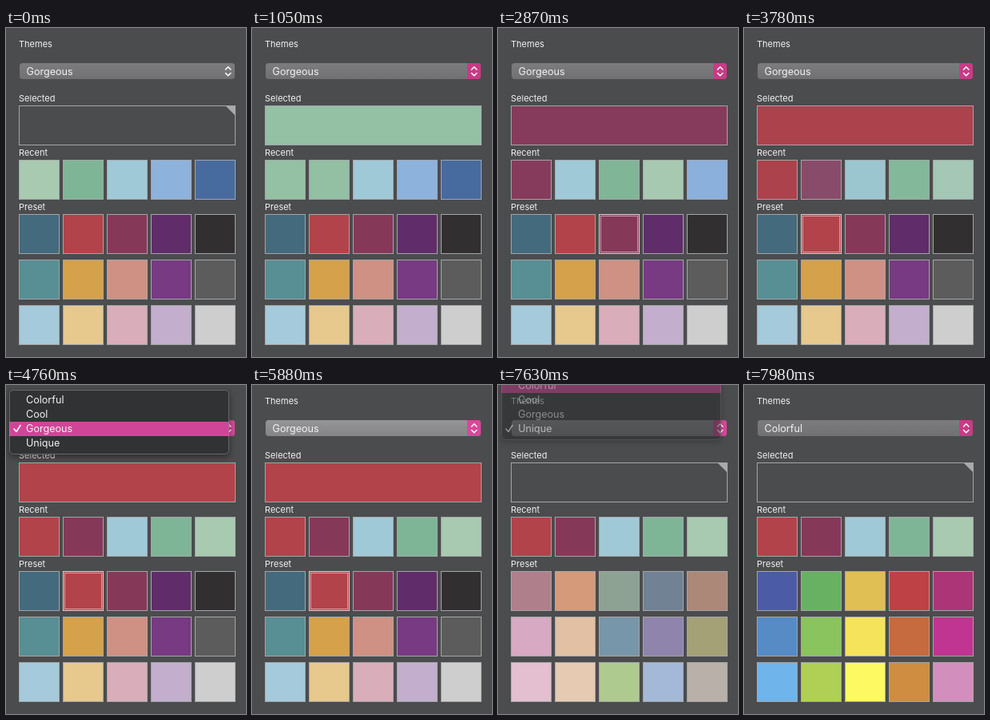
An HTML page with a canvas that plays this animation: 300x412 px, repeating every 8 s.

```html
<!DOCTYPE html>
<html lang="en">
<head>
<meta charset="utf-8">
<title>Theme colour picker</title>
<style>
  html, body { margin: 0; width: 100%; height: 100%; overflow: hidden; background: #4b4c4e; }
  canvas { display: block; }
</style>
</head>
<body>
<canvas width="300" height="412"></canvas>
<script>
const ctx = document.querySelector('canvas').getContext('2d');
const LOOP = 8000, FADE = 500;
const FONT = 'Inter, "Open Sans", sans-serif';
const MENU = ['Colorful', 'Cool', 'Gorgeous', 'Unique'];
const split = s => s.split(' ').map(c => '#' + c);

const THEMES = {
  Gorgeous: split('446a7d b2434a 863859 602c6a 322f31 578f94 d5a14a cf9184 773a83 5c5c5c a5cadb e7c88d d9adb9 c3aecd cecece'),
  Unique: split('af7f8c d59a79 8da293 708293 ab8878 d8a9c3 e2c0a3 7896a9 8f84ab a4a177 e3bfcf e6cab2 afca8f a4b9d8 b8b0a9'),
  Colorful: split('4c5ba5 69b162 e0bf54 bd4145 ab3576 568bc6 89c45f f5e45b c66a3f c03591 6fb4ea afd055 fdf963 ce8d40 d28fbe')
};
const START = split('a8cab0 7fb597 a0c9d8 8db2dc 486b9f');
const [LIGHT_GREEN, GREEN, LIGHT_BLUE] = START;
const [, RED, PLUM] = THEMES.Gorgeous;

// Colour clicks; focus is the index of the clicked preset.
const PICKS = [
  { at: 35, color: LIGHT_GREEN },
  { at: 805, color: GREEN },
  { at: 1645, color: LIGHT_BLUE },
  { at: 2415, color: PLUM, focus: 2 },
  { at: 3395, color: RED, focus: 1 }
];

// Menu visits; moves lists [time, highlighted row].
const VISITS = [
  { open: 4130, close: 5460, top: 6, from: 2, to: 3, moves: [[4130, 2], [5110, 3]] },
  { open: 6580, close: 7350, top: -12, from: 3, to: 0, moves: [[6580, 3], [6860, 2], [7000, 1], [7140, 0]] }
];
const BLINK = 70, HIDE = 140, HIDDEN = 400, APPLY = 490, RELEASED = 630;

const clamp = x => Math.max(0, Math.min(1, x));
const ease = x => (x = clamp(x)) * x * (3 - 2 * x);
const channels = c => [1, 3, 5].map(i => parseInt(c.slice(i, i + 2), 16));

function mix(a, b, k) {
  const to = channels(b);
  return `rgb(${channels(a).map((v, i) => Math.round(v + (to[i] - v) * k))})`;
}

function label(text, x, y, size = 11) {
  ctx.font = `${size}px ${FONT}`;
  ctx.fillStyle = '#f2f2f2';
  ctx.fillText(text, x, y);
}

function line(points, width) {
  ctx.beginPath();
  points.forEach(([x, y]) => ctx.lineTo(x, y));
  ctx.strokeStyle = '#fff';
  ctx.lineWidth = width;
  ctx.lineCap = ctx.lineJoin = 'round';
  ctx.stroke();
}

function roundBox(x, y, w, h, radius, fill) {
  ctx.beginPath();
  ctx.roundRect(x, y, w, h, radius);
  ctx.fillStyle = fill;
  ctx.fill();
}

function frame(x, y, w, h, color) {
  ctx.lineWidth = 1;
  ctx.lineCap = 'butt';
  ctx.lineJoin = 'miter';
  ctx.strokeStyle = color;
  ctx.strokeRect(x + .5, y + .5, w - 1, h - 1);
}

function swatch(x, y, color, focused) {
  ctx.fillStyle = color;
  ctx.fillRect(x, y, 51, 50);
  frame(x, y, 51, 50, focused ? '#d8d0d4' : '#a3a5a6');
  if (!focused) return;
  ctx.setLineDash([1, 1]);
  frame(x + 2, y + 2, 47, 46, '#fff');
  ctx.setLineDash([]);
}

function dropdown(name, active, press) {
  const gray = ctx.createLinearGradient(0, 44, 0, 64);
  gray.addColorStop(0, mix('#7c7c7e', '#959597', press));
  gray.addColorStop(1, mix('#717173', '#858587', press));
  roundBox(17, 44, 269, 20, 4, gray);
  if (active) roundBox(269, 44, 17, 20, [0, 4, 4, 0], mix('#c83b86', '#d8489a', press));
  line([[274.5, 52], [277.7, 48.8], [280.9, 52]], 1.5);
  line([[274.5, 56.5], [277.7, 59.7], [280.9, 56.5]], 1.5);
  label(name, 25.5, 59, 12.6);
}

function selectedBox(color, alpha) {
  ctx.fillStyle = '#a9aaab';
  ctx.beginPath();
  ctx.moveTo(274, 97);
  ctx.lineTo(287, 97);
  ctx.lineTo(287, 110);
  ctx.fill();
  ctx.globalAlpha = alpha;
  ctx.fillStyle = color;
  ctx.fillRect(16, 97, 271, 50);
  ctx.globalAlpha = 1;
  frame(16, 97, 271, 50, '#a3a5a6');
}

function popup(visit, t) {
  const since = t - visit.close;
  if (t < visit.open || since >= HIDDEN) return;
  const { top } = visit;
  const row = visit.moves.filter(m => t >= m[0]).pop()[1];
  ctx.save();
  ctx.globalAlpha = 1 - clamp((since - HIDE) / (HIDDEN - HIDE));
  ctx.shadowColor = 'rgba(0,0,0,.45)';
  ctx.shadowBlur = 8;
  ctx.shadowOffsetY = 3;
  roundBox(4, top, 275, 81, 5, '#313234');
  ctx.shadowColor = 'transparent';
  if (since < 0 || since >= BLINK) {
    ctx.fillStyle = '#d14598';
    ctx.fillRect(4, top + 40 - 36 + row * 18, 275, 18);
  }
  ctx.beginPath();
  ctx.roundRect(4.5, top + .5, 274, 80, 5);
  ctx.strokeStyle = 'rgba(150,150,152,.55)';
  ctx.lineWidth = 1;
  ctx.stroke();
  MENU.forEach((name, i) => label(name, 25, top + 17 + i * 18, 12.6));
  const y = top + 12 + visit.from * 18;
  line([[10, y + 1], [13, y + 4.5], [18, y - 3.5]], 1.6);
  ctx.restore();
}

function draw(t) {
  let recent = START, before = START, chosen = null, previous = null;
  for (const pick of PICKS) {
    if (t < pick.at) break;
    before = recent;
    recent = [pick.color, ...recent.filter(c => c !== pick.color)].slice(0, 5);
    previous = chosen;
    chosen = pick;
  }
  const k = chosen ? ease((t - chosen.at) / FADE) : 0;

  const applied = VISITS.filter(v => t >= v.close + APPLY).pop();
  const theme = applied ? MENU[applied.to] : 'Gorgeous';
  const press = Math.max(...VISITS.map(v =>
    t < v.open ? 0 : 1 - clamp((t - v.close - HIDDEN - 20) / (RELEASED - HIDDEN - 20))));

  ctx.fillStyle = '#4b4c4e';
  ctx.fillRect(0, 0, 300, 412);
  label('Themes', 16, 24);
  label('Selected', 16, 92);
  label('Recent', 16, 160);
  label('Preset', 16, 228);
  dropdown(theme, chosen, press);

  if (!chosen || applied) selectedBox('#000', 0);
  else if (previous) selectedBox(mix(previous.color, chosen.color, k), 1);
  else selectedBox(chosen.color, k);

  recent.forEach((c, i) => swatch(16 + 55 * i, 165, mix(before[i], c, k)));
  THEMES[theme].forEach((c, i) => swatch(
    16 + 55 * (i % 5), 233 + 57 * Math.floor(i / 5), c,
    !applied && chosen && chosen.focus === i));
  VISITS.forEach(v => popup(v, t));
}

const begin = performance.now();
function tick() {
  draw((performance.now() - begin) % LOOP);
  requestAnimationFrame(tick);
}
tick();
</script>
</body>
</html>
```
